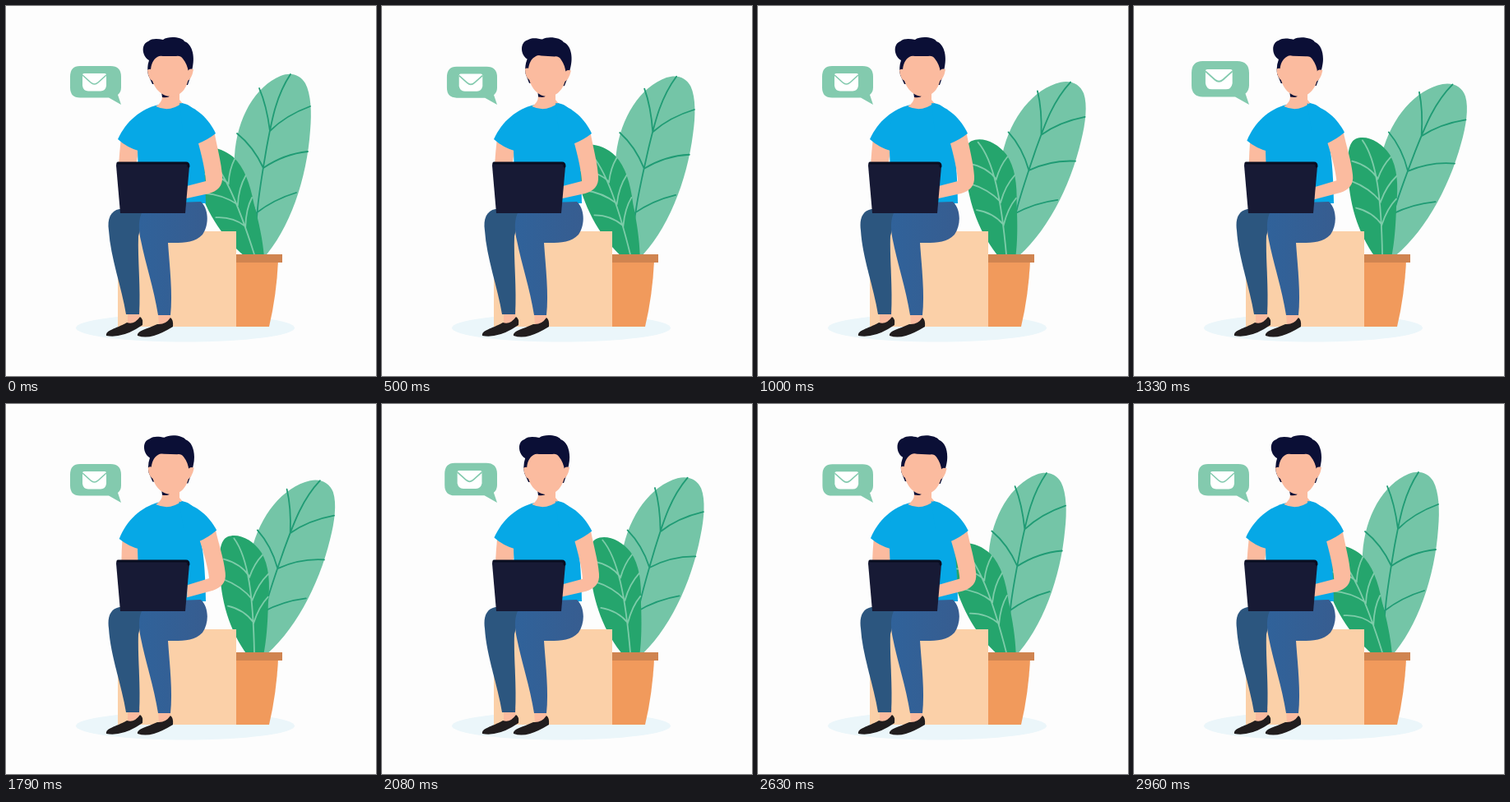
An HTML page for the animation above (3 s loop, 450 px wide and 450 px high).

```html
<!DOCTYPE html>
<html lang="en">
<head>
<meta charset="utf-8">
<title>Working from home</title>
<style>
html, body { margin: 0; width: 100%; height: 100%; overflow: hidden; background: #fdfdfd; }
svg { display: block; width: 100vw; height: 100vh; }
.skin { fill: #fbbb9f; }
.shirt { fill: #06a8e6; }
.hair { fill: #0b0f36; }
.shoe { fill: #211d1e; }
.vein { fill: none; stroke-width: 1.8; stroke-linecap: round; }
</style>
</head>
<body>
<svg viewBox="0 0 450 450">
  <defs>
    <linearGradient id="jeans" x1="0" y1="0" x2="1" y2="0">
      <stop offset="0" stop-color="#30629a"/>
      <stop offset="1" stop-color="#375d90"/>
    </linearGradient>
  </defs>
  <ellipse cx="218" cy="391.5" rx="133" ry="17" fill="#ebf6fa"/>

  <g id="bigLeaf">
    <path fill="#74c5a7" d="M296 308C287 268 274 219 278 182C281 136 303 98 334 85C347 80 358 84 364 94C371 107 372 130 370 151C366 210 345 272 312 308Z"/>
    <path class="vein" stroke="#1f9b74" d="M346 83C328 110 323 140 317 172C310 214 303 250 303 306M308 100Q317 121 321 152Q340 133 370 122M281 155Q301 171 313 197Q338 180 367 177M277 201Q296 225 304 252Q326 235 353 227"/>
  </g>
  <g id="smallLeaf">
    <path fill="#25a56d" d="M294 306C272 275 262 237 262 199C261 181 263 165 272 161C285 156 303 165 313 181C322 197 323 218 320 243C319 267 317 288 313 306Z"/>
    <path class="vein" stroke="#7dcca9" d="M280 163C297 187 302 235 302 304M267 188Q288 194 298 210Q304 194 314 184M265 212Q288 221 301 238Q308 219 321 207M271 245Q291 250 302 266Q309 246 320 235"/>
  </g>

  <path fill="#f19a5c" d="M270 310H331Q329 352 320 390H270Z"/>
  <path fill="#d08450" d="M270 302H336V312H270Z"/>
  <path fill="#fbd0a8" d="M136 274H280V390H136Z"/>

  <g id="leftArm">
    <path class="skin" d="M140 160L162 172L158 194H137Q138 178 140 160Z"/>
    <path class="shirt" d="M186 120C164 125 146 140 136 162Q147 172 161 176L182 152Z"/>
  </g>

  <path class="skin" d="M190 98H211V114L216 120L200 134L181 123Q190 118 190 110Z"/>
  <g id="head">
    <path class="hair" d="M189 105L199 109Q198 112 190 111Z"/>
    <path class="hair" d="M174 66C165 61 164 46 173 43C178 39 185 40 191 41C198 36 214 38 217 43C226 46 230 60 227 74L225 84L221 96L178 95L173 84Q171 75 174 66Z"/>
    <path class="skin" d="M172 78Q176 75 180 80V92Q173 90 172 78ZM228 77Q222 75 220 81L219 92Q226 90 228 77Z"/>
    <path class="skin" d="M176 80C176 71 179 65 184 62Q187 60 191 61H207Q212 60 215 64C219 69 221 74 222 81C223 98 213 110 201 110C187 110 177 97 176 80Z"/>
  </g>

  <path class="shirt" d="M182 122Q199 130 214 118C229 121 237 132 236 164Q242 182 243 240H162L160 176V146Q166 126 182 122Z"/>

  <path class="skin" d="M148 370H163L161 389H148ZM185 370H200V390H186Z"/>
  <path class="shoe" d="M122 401C121 394 133 393 147 385Q156 388 163 378Q167 380 166 388L158 393Q139 404 122 401Z"/>
  <path class="shoe" d="M160 401C159 395 171 393 184 387Q194 388 200 379Q204 382 203 390Q190 398 180 401Q169 404 160 401Z"/>
  <path fill="#2c567f" d="M138 247C127 249 123 259 125 273C127 306 141 343 146 375H162C164 344 160 307 161 280L169 249Z"/>
  <path fill="url(#jeans)" d="M175 240L237 238C246 246 248 265 239 278C229 289 213 288 197 288C199 317 203 350 200 376H185C180 344 170 315 164 285C160 266 161 250 175 240Z"/>

  <g id="rightArm">
    <path class="skin" d="M232 160L253 151C257 174 262 190 263 207C264 219 257 225 247 228L215 235L216 220L243 213Q242 195 232 160Z"/>
    <path class="shirt" d="M211 118C233 123 247 138 255 155Q245 163 232 168L215 151Z"/>
  </g>

  <path fill="#171a35" d="M137 190H219Q223 190 223 195L218 252H139L134 194Q134 190 137 190Z"/>
  <path fill="none" stroke="#090d20" stroke-width="3" stroke-linecap="round" d="M136 191H219Q222 191 222 195"/>

  <g id="bubble">
    <path fill="#83caae" d="M90 73H127Q140 73 140 86V99Q140 105 136 108L140 120L125 111.5H90Q78 111.5 78 99V86Q78 73 90 73Z"/>
    <path fill="#fff" d="M93 84Q93 82 95 82H120Q122 82 122 84V97Q121 103.500 115 103.500H100Q94 103.500 93 97Z"/>
    <path fill="none" stroke="#83caae" stroke-width="1.6" d="M93 84L103 93Q107.500 97 112 93L122 84"/>
  </g>
</svg>
<script>
const LOOP = 3000;
const el = id => document.getElementById(id);
const parts = Object.fromEntries(
  ["bigLeaf", "smallLeaf", "leftArm", "rightArm", "head", "bubble"].map(id => [id, el(id)]));
const ease = p => (1 - Math.cos(Math.PI * p)) / 2;
const wave = (t, period) => ease(2 * t / period);
const turn = (id, angle, x, y) =>
  parts[id].setAttribute("transform", `rotate(${angle} ${x} ${y})`);

// [phase, scale] steps of the bubble's one-second pulse
const pulse = [[0, 1], [0.28, 1.15], [0.5, 0.985], [0.75, 1], [1, 1]];
function pulseAt(p) {
  const i = pulse.findIndex(step => step[0] > p);
  const [a, from] = pulse[i - 1], [b, to] = pulse[i];
  return from + (to - from) * ease((p - a) / (b - a));
}

function draw(t) {
  const sway = t < 1400 ? ease(t / 1400) : 1 - ease(Math.min(1, (t - 1400) / 1580));
  turn("bigLeaf", 11.2 * sway, 303, 302);
  turn("smallLeaf", -17.5 * (1 - wave(t - 50, LOOP)), 303, 302);
  turn("head", 3.2 * wave(t, 1000), 200, 112);
  const typing = -3 * wave(t, 500);
  turn("leftArm", typing, 178, 128);
  turn("rightArm", typing, 224, 130);
  const s = pulseAt(t % 1000 / 1000);
  parts.bubble.setAttribute("transform", `translate(140 120) scale(${s}) translate(-140 -120)`);
}

const start = performance.now();
function frame() {
  draw((performance.now() - start) % LOOP);
  requestAnimationFrame(frame);
}
frame();
</script>
</body>
</html>
```
